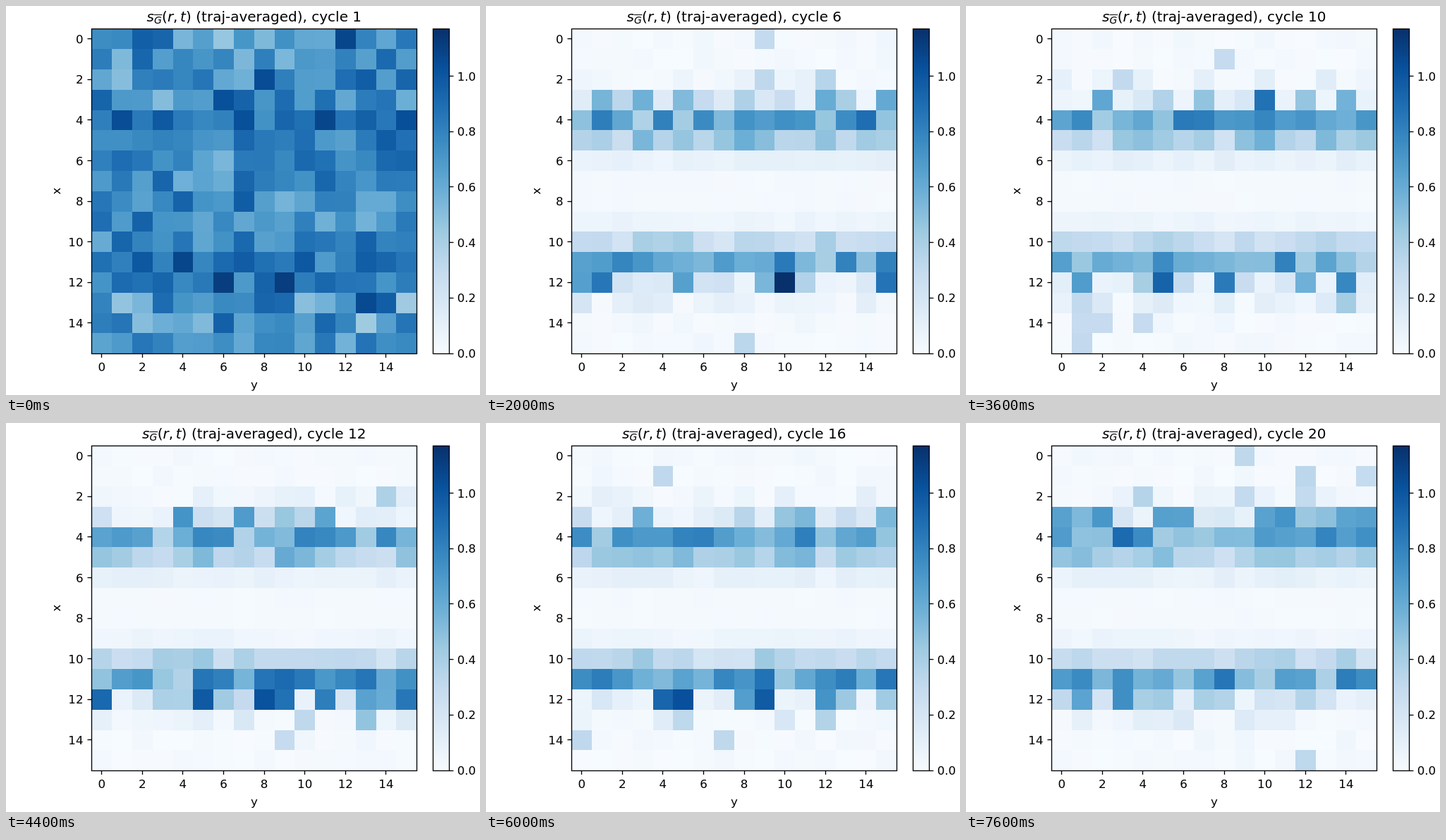
These frames come from a looping animation (672x552 px, 8 s). An HTML page:

```html
<!DOCTYPE html>
<html lang="en">
<head>
<meta charset="utf-8">
<title>Heatmap by cycle</title>
<style>
  html, body { margin: 0; width: 100%; height: 100%; overflow: hidden; background: #fff; }
  svg { display: block; font-family: "DejaVu Sans", sans-serif; font-size: 16.67px; }
  .frame, .tick { fill: none; stroke: #000; stroke-width: 1.33; }
  #title { font-size: 20px; }
  .math { font-style: italic; }
  .sub { font-size: 14px; }
</style>
</head>
<body>
<svg id="plot" width="672" height="552" viewBox="0 0 672 552">
  <defs><linearGradient id="blues" x1="0" y1="1" x2="0" y2="0"></linearGradient></defs>
  <g id="cells" shape-rendering="crispEdges"></g>
  <rect x="605" y="32" width="23" height="461" fill="url(#blues)"/>
  <rect class="frame" x="121.5" y="32.5" width="461" height="461"/>
  <rect class="frame" x="605.5" y="32.5" width="23" height="461"/>
  <g id="axes"></g>
  <text x="352" y="543" text-anchor="middle">y</text>
  <text transform="translate(76.5 262.5) rotate(-90)" text-anchor="middle">x</text>
  <g id="title">
    <text class="math" x="0" y="22">s</text>
    <text class="math sub" x="10.4" y="25.3">G</text>
    <path d="M10.5 12.5H22" stroke="#000"/>
    <text x="21.6" y="22">(</text>
    <text class="math" x="29.4" y="22">r</text>
    <text x="37.6" y="22">,</text>
    <text class="math" x="47.6" y="22">t</text>
    <text x="55.4" y="22">)</text>
    <text id="caption" x="69.8" y="22"></text>
  </g>
</svg>
<script>
const SIZE = 16, CELL = 28.8, LEFT = 121.3, TOP = 32.3;
const CYCLES = 20, STEP = 400, VMAX = 1.171;
const BLUES = ['#f7fbff', '#deebf7', '#c6dbef', '#9ecae1', '#6baed6',
  '#4292c6', '#2171b5', '#08519c', '#08306b'];

const $ = id => document.getElementById(id);

function add(parent, tag, attrs, text = '') {
  const el = document.createElementNS('http://www.w3.org/2000/svg', tag);
  for (const key in attrs) el.setAttribute(key, attrs[key]);
  el.textContent = text;
  parent.append(el);
  return el;
}

function seeded(seed) {
  return () => {
    seed = seed + 0x6D2B79F5 | 0;
    let t = Math.imul(seed ^ seed >>> 15, 1 | seed);
    t ^= t + Math.imul(t ^ t >>> 7, 61 | t);
    return ((t ^ t >>> 14) >>> 0) / 4294967296;
  };
}

function blue(value) {
  const pos = Math.min(Math.max(value / VMAX, 0), 1) * (BLUES.length - 1);
  const i = Math.min(Math.floor(pos), BLUES.length - 2);
  const part = (hex, k) => parseInt(hex.slice(1 + 2 * k, 3 + 2 * k), 16);
  const mix = k => Math.round(part(BLUES[i], k) + (part(BLUES[i + 1], k) - part(BLUES[i], k)) * (pos - i));
  return `rgb(${mix(0)},${mix(1)},${mix(2)})`;
}

// Long-run mean of a row: two bands on a faint floor
const band = (row, center) => .62 * Math.exp(-((row - center) ** 2) / 1.6);
const rowMean = row => .015 + band(row, 4.15) + band(row, 11.1);

// A disordered start relaxes into the bands; outer rows stay patchy with stray sparks
function field(cycle) {
  const rand = seeded(cycle * 977);
  const disorder = .3 ** (cycle - 1);
  return Array.from({ length: SIZE * SIZE }, (_, i) => {
    const row = Math.floor(i / SIZE), mean = rowMean(row);
    const outer = row < 4 || row > 11;
    const a = rand(), bell = (a + rand()) / 2;
    const spark = rand() < .045 + 2 * disorder && outer ? .29 : 0;
    const calm = mean * (outer ? .15 + 2.55 * a * a : .5 + bell) + spark;
    const mixed = .76 + .2 * mean + (bell - .5) * (outer ? .75 : .5);
    return calm + (mixed - calm) * disorder;
  });
}

BLUES.forEach((color, i) =>
  add($('blues'), 'stop', { offset: i / (BLUES.length - 1), 'stop-color': color }));

const cells = Array.from({ length: SIZE * SIZE }, (_, i) => {
  const x = Math.round(LEFT + i % SIZE * CELL);
  const y = Math.round(TOP + Math.floor(i / SIZE) * CELL);
  return add($('cells'), 'rect', { x, y, width: 29, height: 29 });
});

const snap = v => Math.floor(v) + .5;
const tick = d => add($('axes'), 'path', { d, class: 'tick' });
const label = (x, y, anchor, text) => add($('axes'), 'text', { x, y, 'text-anchor': anchor }, text);

for (let n = 0; n < SIZE; n += 2) {
  const x = LEFT + (n + .5) * CELL, y = TOP + (n + .5) * CELL;
  tick(`M${snap(x)} 494v5`);
  label(x, 518, 'middle', n);
  tick(`M121 ${snap(y)}h-5.5`);
  label(109.5, Math.round(y + 6), 'end', n);
}
for (let n = 0; n <= 5; n++) {
  const y = 493.1 - n * 78.72;
  tick(`M629 ${snap(y)}h5.5`);
  label(639.7, Math.round(y + 6), 'start', (n / 5).toFixed(1));
}

let shown = 0;
function draw() {
  const cycle = Math.floor(performance.now() / STEP) % CYCLES + 1;
  if (cycle !== shown) {
    shown = cycle;
    field(cycle).forEach((value, i) => cells[i].setAttribute('fill', blue(value)));
    $('caption').textContent = `(traj-averaged), cycle ${cycle}`;
    $('title').setAttribute('transform', `translate(${cycle < 10 ? 199.5 : 193.1} 0)`);
  }
  requestAnimationFrame(draw);
}
draw();
</script>
</body>
</html>
```
